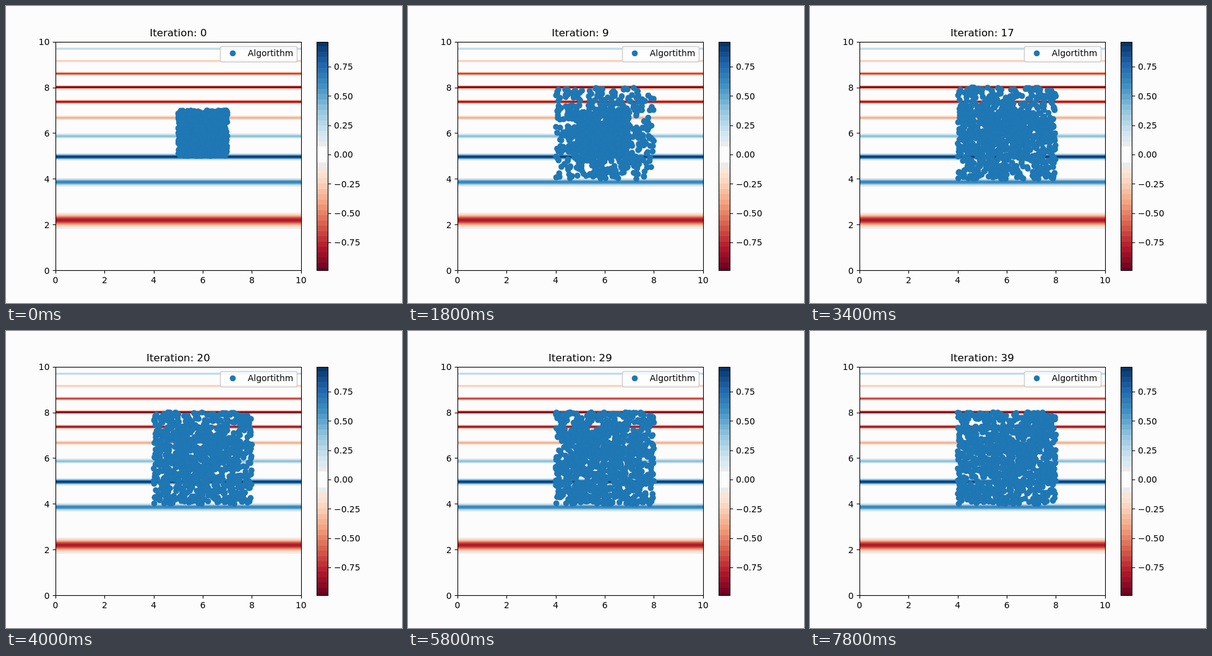
An HTML page with a canvas that plays this animation: 640x480 px, repeating every 8000 ms.

```html
<!DOCTYPE html>
<html lang="en">
<head>
<meta charset="utf-8">
<title>Iteration plot</title>
<style>
html, body { margin: 0; width: 100%; height: 100%; overflow: hidden; background: #fcfcfc; }
canvas { display: block; }
</style>
</head>
<body>
<canvas id="stage" width="640" height="480"></canvas>
<script>
const ctx = document.getElementById('stage').getContext('2d');
const LEFT = 80, RIGHT = 476.8, TOP = 57.6, BOTTOM = 427.2;
const BAR_LEFT = 502, BAR_RIGHT = 520, MIN = -0.988, MAX = 0.964;
const STEPS = 40, STEP_MS = 200, COUNT = 1000;
const BACKGROUND = '#fcfcfc', BLUE = '#1f77b4';
const FONT = '"DejaVu Sans", sans-serif';
const RED_BLUE = ['67001f', 'b2182b', 'd6604d', 'f4a582', 'fddbc7', 'f7f7f7',
  'd1e5f0', '92c5de', '4393c3', '2166ac', '053061']
  .map(hex => [0, 2, 4].map(i => parseInt(hex.slice(i, i + 2), 16)));

const plotX = x => LEFT + x * (RIGHT - LEFT) / 10;
const plotY = y => BOTTOM - y * (BOTTOM - TOP) / 10;
const barY = v => TOP + (MAX - v) * (BOTTOM - TOP) / (MAX - MIN);
const snap = v => Math.floor(v + 0.5) + 0.5;

// Michalewicz term, constant along x
const field = y => -Math.sin(y) * Math.sin(y * y / Math.PI) ** 20;

function levelColor(value) {
  const level = Math.round(value / 0.045);
  if (Math.abs(level) < 2) return BACKGROUND;
  if (Math.abs(level) === 2) return '#ebebeb';
  const t = (level * 0.045 - MIN) / (MAX - MIN);
  const pos = Math.min(1, Math.max(0, t)) * 10;
  const i = Math.min(9, Math.floor(pos));
  const mix = RED_BLUE[i].map((c, k) => Math.round(c + (RED_BLUE[i + 1][k] - c) * (pos - i)));
  return `rgb(${mix})`;
}

let seed = 20;
function random() {
  seed = (seed + 0x6d2b79f5) | 0;
  let h = Math.imul(seed ^ (seed >>> 15), 1 | seed);
  h = (h + Math.imul(h ^ (h >>> 7), 61 | h)) ^ h;
  return ((h ^ (h >>> 14)) >>> 0) / 4294967296;
}
const between = (a, b) => a + (b - a) * random();
const inside = v => v >= 4 && v <= 8;

// A few points per step make a local or a global move within the square
function advance(point) {
  const chance = random();
  if (chance < 0.065) return [between(4, 8), between(4, 8)];
  if (chance < 0.13) {
    const moved = point.map(v => v + between(-0.8, 0.8));
    if (moved.every(inside)) return moved;
  }
  return point;
}

const states = [Array.from({ length: COUNT }, () => [between(5, 7), between(5, 7)])];
while (states.length < STEPS) states.push(states[states.length - 1].map(advance));

function text(label, x, y, align = 'left', size = 13.89) {
  ctx.font = `${size}px ${FONT}`;
  ctx.textAlign = align;
  ctx.fillStyle = '#000';
  ctx.fillText(label, x, y);
}

function line(x1, y1, x2, y2) {
  ctx.beginPath();
  ctx.moveTo(x1, y1);
  ctx.lineTo(x2, y2);
  ctx.stroke();
}

function dot(x, y) {
  ctx.fillStyle = BLUE;
  ctx.beginPath();
  ctx.arc(x, y, 4.86, 0, 2 * Math.PI);
  ctx.fill();
}

function drawField() {
  for (let row = 58; row < 428; row++) {
    const center = row + 0.5;
    ctx.fillStyle = levelColor(field((BOTTOM - center) * 10 / (BOTTOM - TOP)));
    ctx.fillRect(LEFT, row, 397, 1);
    ctx.fillStyle = levelColor(MAX - (center - TOP) * (MAX - MIN) / (BOTTOM - TOP));
    ctx.fillRect(BAR_LEFT, row, BAR_RIGHT - BAR_LEFT, 1);
  }
}

function drawAxes() {
  ctx.strokeStyle = '#000';
  ctx.lineWidth = 1.11;
  ctx.strokeRect(80.5, 58.5, 397, 369);
  ctx.strokeRect(502.5, 58.5, 18, 369);
  for (let v = 0; v <= 10; v += 2) {
    const x = snap(plotX(v)), y = snap(plotY(v));
    line(x, 427.5, x, 432.4);
    line(75.6, y, 80.5, y);
    text(v, plotX(v), 447.6, 'center');
    text(v, 70.5, plotY(v) + 5.3, 'right');
  }
  for (let v = -0.75; v <= 0.75; v += 0.25) {
    const y = barY(v);
    line(520.5, snap(y), 525.4, snap(y));
    text(v.toFixed(2).replace('-', '\u2212'), 530, y + 5.3);
  }
}

function drawLegend() {
  ctx.beginPath();
  ctx.roundRect(346.5, 65.5, 124, 25, 2.8);
  ctx.fillStyle = 'rgba(255, 255, 255, 0.8)';
  ctx.fill();
  ctx.strokeStyle = '#ccc';
  ctx.lineWidth = 1.39;
  ctx.stroke();
  dot(366.5, 76.5);
  text('Algortithm', 390.8, 81.3);
}

function draw(iteration) {
  ctx.fillStyle = BACKGROUND;
  ctx.fillRect(0, 0, 640, 480);
  drawField();
  for (const [x, y] of states[iteration]) dot(plotX(x), plotY(y));
  drawAxes();
  drawLegend();
  text(`Iteration: ${iteration}`, 278.4, 49.3, 'center', 16.67);
}

const start = performance.now();
let shown = -1;
function tick() {
  const iteration = Math.floor((performance.now() - start) / STEP_MS) % STEPS;
  if (iteration !== shown) draw(shown = iteration);
  requestAnimationFrame(tick);
}
tick();
</script>
</body>
</html>
```
